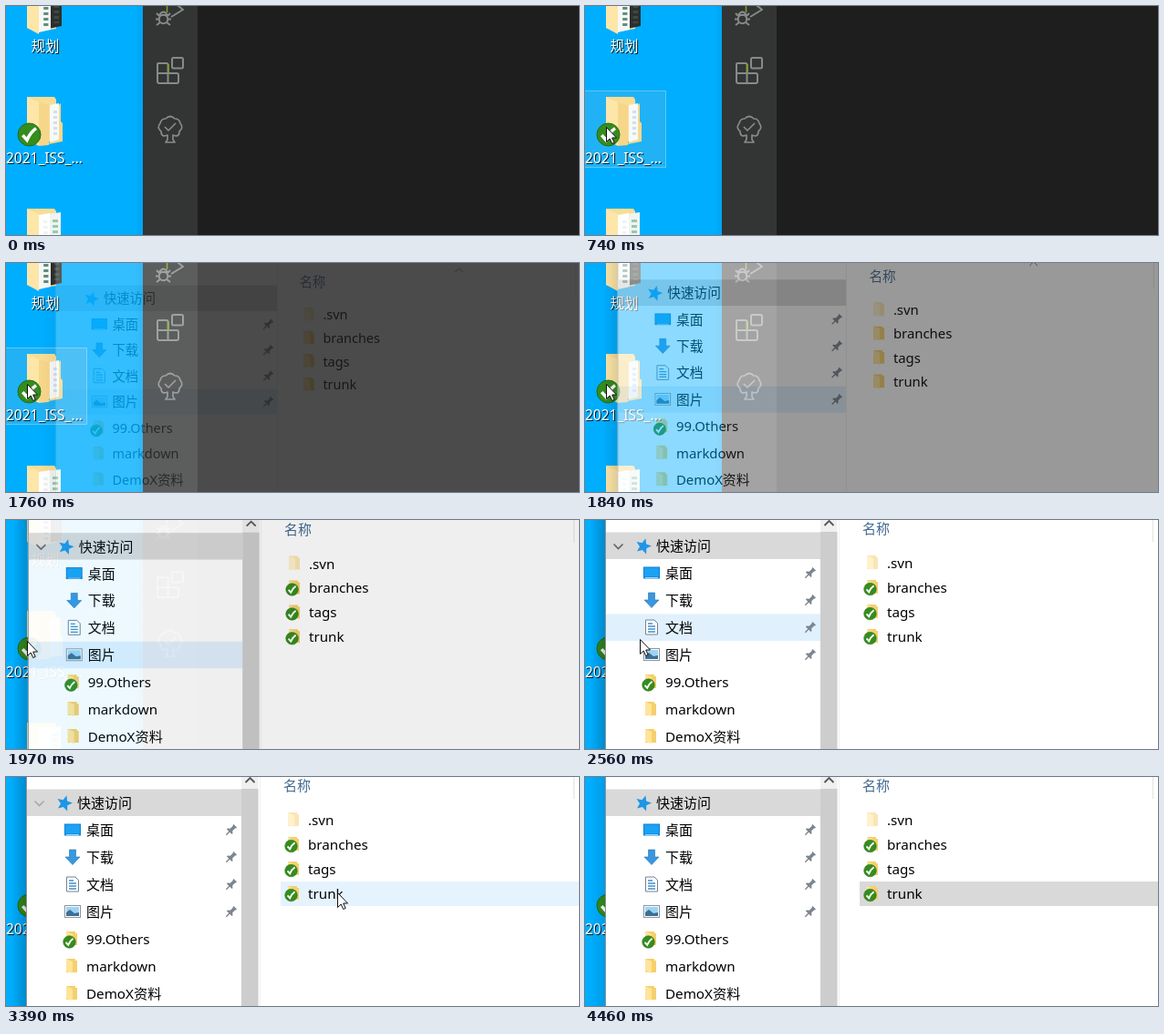
Animation, 628 px wide and 252 px high, one loop 4.53 s. Source, as an HTML page:

```html
<!DOCTYPE html>
<html lang="zh">
<head>
<meta charset="utf-8">
<style>
html, body { margin: 0; width: 100%; height: 100%; overflow: hidden; background: #1e1e1e; }
svg { display: block; }
text { font: 15.2px "Noto Sans", "Noto Sans CJK SC", "Noto Sans CJK", sans-serif; }
.cjk { font-size: 15px; }
.label { font-size: 15.5px; fill: #fff; filter: drop-shadow(1px 1px .6px #000d); }
.line { fill: none; stroke: #868b8a; stroke-width: 2; stroke-linejoin: round; }
</style>
</head>
<body>
<svg id="stage" width="628" height="252" viewBox="0 0 628 252"></svg>
<script>
const LOOP = 4530;

const at = (x, y, body, extra = "") => `<g transform="translate(${x} ${y})" ${extra}>${body}</g>`;
const rect = (x, y, w, h, fill, extra = "") =>
  `<rect x="${x}" y="${y}" width="${w}" height="${h}" fill="${fill}" ${extra}/>`;
const path = (d, fill, extra = "") => `<path d="${d}" fill="${fill}" ${extra}/>`;
const text = (x, y, s, extra = "") => `<text x="${x}" y="${y}" ${extra}>${s}</text>`;

const badge = (x, y, r) => at(x, y,
  `<circle r="${r}" fill="#358d1e" stroke="#236c14" stroke-width="${r * .08}"/>` +
  path(`M${-r * .58} ${r * .05}L${-r * .2} ${r * .48}Q${r * .1} ${-r * .2} ${r * .6} ${-r * .55}`, "none",
    `stroke="#fff" stroke-width="${r * .28}"`));

// Large desktop folder: back panel, contents, front flap
const bigFolder = (y, contents) => at(23, y,
  path("M0 0H30L32 3V48L14 51L0 47Z", "#f9dd95") + contents +
  path("M0 0L13 6V54L0 47Z", "#fde6a8"));

const sheet = (x, y, w, h, fill, ink) =>
  path(`M${x} ${y + 2}L${x + w} ${y}V${y + h - 3}L${x} ${y + h}Z`, fill) +
  path(`M${x + w * .6} ${y + 8}V${y + h - 6}`, "none",
    `stroke="${ink}" stroke-width="${w * .4}" stroke-dasharray="3 3"`);

const smallFolder = (x, y, opacity = 1) => at(x, y,
  path("M-6 -8H4V-6H6V7H-6Z", "#f6cf6b") + path("M-6 -8L1 -5V8L-6 6Z", "#ffe49a"),
  `opacity="${opacity}"`);

const pin = y => `<g transform="translate(247 ${y}) rotate(45)">${
  path("M-2.5 -6H2.5V-5L1.8 -4V0L4 2V3.2H.7V8H-.7V3.2H-4V2L-1.8 0V-4L-2.5 -5Z", "#7c8590")}</g>`;

const star = () => {
  const points = Array.from({ length: 10 }, (_, i) => {
    const a = i * Math.PI / 5 - 1.3, r = i % 2 ? 4 : 9;
    return `${(r * Math.cos(a)).toFixed(1)},${(r * Math.sin(a)).toFixed(1)}`;
  });
  return at(64, 29, `<polygon points="${points.join(" ")}" fill="#1e96e6"/>`);
};

const navIcons = [
  at(73, 58, rect(-9, -6.5, 18, 13, "#0f7fd6") + rect(-8, -5.5, 16, 10, "#1ba2f2") + rect(-7, 5, 14, 1, "#9bd6ff")),
  at(73, 88, path("M-3.5 -8H3.5V0H8L0 8.5L-8 0H-3.5Z", "#3a96dd", 'stroke="#2a7fc2" stroke-width=".7"')),
  at(73, 118, path("M-6.5 -8H3L6.5 -4.5V8H-6.5Z", "#fff", 'stroke="#75828e"') +
    path("M-4 -4H1M-4 -1H4M-4 2H4M-4 5H4", "none", 'stroke="#3f8fc9" stroke-width="1.3"')),
  at(73, 148, rect(-8.5, -6.5, 17, 13, "#fff", 'stroke="#8795a1"') + rect(-7, -5, 14, 10, "#9fd3f5") +
    path("M-7 1L-3 -2L2 2L7 1V5H-7Z", "#3b6f93")),
];

const desktop = `
  ${rect(0, 0, 150, 252, "#00aeff")}
  ${bigFolder(-23, sheet(24, 2, 14, 46, "#2b2f2d", "#3c4a42") + sheet(13, 4, 13, 48, "#f6f8f6", "#5f8f7c"))}
  ${text(43, 50, "规划", 'class="label" text-anchor="middle"')}
  <g id="iconHover">${rect(-1, 93.5, 89.5, 84, "#a0c2c8", 'fill-opacity=".2" stroke="#d8e8f0" stroke-opacity=".4"')}</g>
  ${bigFolder(100,
    path("M34 26L35 9L37 7V27L39 29V49L24 52Z", "#f8d98f") +
    sheet(25, 7, 10, 43, "#f7f9fa", "#cfe0ee") +
    path("M13 6L24 9V53L13 54Z", "#f6d78a"))}
  ${badge(25.5, 141.5, 12.5)}
  ${text(0, 173, "2021_ISS_...", 'class="label"')}
  ${bigFolder(223, sheet(22, 4, 15, 46, "#eef4f1", "#9cc7ad") + sheet(13, 5, 12, 48, "#fff", "#f0f3f2"))}
  ${rect(142, 0, 8, 252, "url(#shade)", 'opacity=".3"')}`;

const editor = `
  ${rect(150, 0, 478, 252, "#1e1e1e")}
  ${rect(150, 0, 60, 252, "#333434")}
  <g class="line">
    <path d="M179 -8L194 4L181 12"/>
    <circle cx="172.5" cy="14.500" r="4.8"/>
    <path d="M168 10Q172.500 3 177 10ZM165 8L168 11M180 8L177 11M164 14.500H168M177 14.500H181M165 21L169 18M180 21L176 18"/>
    <path d="M167 63H176Q177.500 63 177.500 64.500V74H187Q189 74 189 76V83Q189 85 187 85H168Q166 85 166 83V64Q166 63 167 63ZM177.500 74V85M166 74H177.500"/>
    <rect x="182" y="57" width="12" height="11.500" rx="1.500"/>
    <path stroke-width="1.700" d="M177 142Q170 145 170 138Q165 134 169 129Q170 124 175 124Q180 119 185 124Q190 124 191 129Q195 134 190 138Q190 145 183 142V147L185 150H175L177 147Z"/>
    <path stroke-width="1.700" d="M174 133L178 137L186 129"/>
  </g>
  ${path("M178 64V74M176.500 0V7", "none", 'stroke="#83a21c" stroke-width="1.5"')}`;

const placeNames = ["桌面", "下载", "文档", "图片"];
const folderNames = ["99.Others", "markdown", "DemoX资料"];
const files = [".svn", "branches", "tags", "trunk"];

const explorer = `
  <rect id="shadow" x="5" y="-20" width="17" height="320" fill="url(#shade)"/>
  ${rect(22, -20, 900, 330, "#fff")}
  ${rect(22, -20, 1, 330, "#8b9298")}
  ${rect(23, 13.5, 235, 29.5, "#d9d9d9", 'id="quickRow"')}
  ${rect(23, 133.5, 235, 29.5, "#e0f0fd", 'id="navHover"')}
  ${star()}${text(78, 34, "快速访问", 'class="cjk"')}
  ${path("M31.5 26.5L36.5 31.5L41.5 26.5", "none", 'id="chevron" stroke="#666" stroke-width="1.7"')}
  ${navIcons.join("")}
  ${placeNames.map((s, i) => text(88, 64 + 30 * i, s, 'class="cjk"')).join("")}
  ${folderNames.map((s, i) => smallFolder(72, 178 + 30 * i) + text(88, 184 + 30 * i, s)).join("")}
  ${badge(69.5, 181.5, 6.8)}
  <g id="pins">${placeNames.map((_, i) => pin(58 + 30 * i)).join("")}</g>
  <g id="scrollbar">
    ${rect(258, -20, 18.5, 330, "#f0f0f0")}${rect(258, 13, 18.5, 300, "#cdcdcd")}
    ${path("M262.500 6L267.500 1L272.500 6", "none", 'stroke="#555" stroke-width="1.8"')}
  </g>
  ${rect(278, -20, 1, 330, "#f0f0f0")}
  ${path("M483.500 -2L488 -6.500L492.500 -2", "none", 'stroke="#777"')}
  ${rect(622, -20, 1, 44, "#e2e2e2")}
  ${text(304, 15, "名称", 'class="cjk" fill="#41698f"')}
  ${rect(301, 0, 600, 27, "#e5f3ff", 'id="fileRow"')}
  ${files.map((s, i) => smallFolder(315, 47 + 27 * i, i ? 1 : .5) + text(331, 53 + 27 * i, s)).join("")}
  <g id="badges">${[1, 2, 3].map(i => badge(312.5, 49 + 27 * i, 6.8)).join("")}</g>`;

const stage = document.getElementById("stage");
stage.innerHTML = `
  <defs>
    <linearGradient id="shade"><stop stop-color="#000" stop-opacity="0"/><stop offset="1" stop-color="#000" stop-opacity=".2"/></linearGradient>
  </defs>
  ${desktop}${editor}
  <g id="explorer">${explorer}</g>
  ${path("M.5 .5V16.500L4.200 13L6.700 18.500L9.200 17.400L6.700 12H11.500Z", "#fff", 'id="cursor" stroke="#111" stroke-width="1"')}`;

const $ = Object.fromEntries([...stage.querySelectorAll("[id]")].map(e => [e.id, e]));
const set = (el, attrs) => Object.entries(attrs).forEach(([k, v]) => el.setAttribute(k, v));
const show = (el, on) => set(el, { display: on ? "inline" : "none" });

// Stepped tracks: [time, ...values]
const cursorTrack = [
  [0], [130, 457, 204], [200, 390, 189], [270, 300, 170], [340, 205, 153], [410, 122, 141],
  [470, 68, 136], [540, 30, 134], [610, 14, 133], [740, 23, 133],
  [2560, 60, 131], [2630, 200, 121], [2700, 350, 109], [2770, 445, 102], [2830, 481, 100],
  [2900, 489, 99], [2970, 487, 100], [3040, 470, 104], [3110, 430, 112], [3180, 395, 120],
  [3320, 370, 126], [3390, 363, 127], [3790, 425, 172], [3860, 511, 232], [3930],
];
const openTrack = [
  [0, .94, 0], [1760, .95, .2], [1840, .979, .55], [1900, .991, .78],
  [1970, .997, .93], [2040, .999, .99], [2100, 1, 1],
];
const sample = (track, t) => track.findLast(k => k[0] <= t).slice(1);

function draw(t) {
  const [x, y] = sample(cursorTrack, t);
  const [scale, opacity] = sample(openTrack, t);
  const visible = x !== undefined;
  const early = t < 1900;
  const selected = t >= 3530;
  const focused = t < 4460;

  show($.cursor, visible);
  if (visible) set($.cursor, { transform: `translate(${x} ${y})` });
  show($.iconHover, visible && x < 89 && t < 1840);

  show($.explorer, opacity > 0);
  set($.explorer, { opacity, transform: `translate(659 240) scale(${scale}) translate(-659 -240)` });
  set($.shadow, { opacity: focused ? 1 : .5 });

  // The navigation pane lays out wide before its scrollbar arrives
  const navWidth = early ? 255 : 235;
  set($.quickRow, { width: navWidth });
  set($.navHover, { width: navWidth, y: 13.5 + 30 * Math.floor((y - 13) / 30) || 0 });
  show($.navHover, visible && x >= 22 && x < 258);
  show($.scrollbar, !early);
  show($.badges, !early);
  show($.pins, early || t >= 2040);
  set($.pins, { transform: `translate(${early ? 21 : 0} 0)` });
  show($.chevron, !early);
  set($.chevron, { opacity: Math.max(0, Math.min(1, (3590 - t) / 480)) });

  const row = selected ? 3 : Math.floor((y - 34) / 27);
  show($.fileRow, selected || (visible && x > 301 && row >= 0 && row < 4));
  set($.fileRow, {
    y: 34 + 27 * (row || 0),
    fill: !selected ? "#e5f3ff" : focused ? "#cce8ff" : "#d9d9d9",
  });
}

const start = performance.now();
function tick() {
  draw((performance.now() - start) % LOOP);
  requestAnimationFrame(tick);
}
draw(0);
requestAnimationFrame(tick);
</script>
</body>
</html>
```
